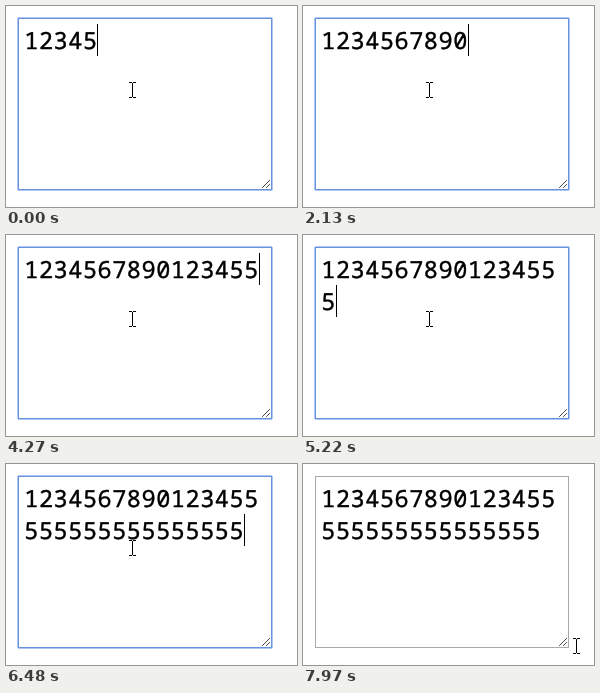
Recreate the animation shown at these times as an HTML page. Size 291x201 px, loop 8000 ms.

```html
<!DOCTYPE html>
<html lang="en">
<head>
<meta charset="utf-8">
<title>Typing in a text area</title>
<style>
  html, body { margin: 0; width: 100%; height: 100%; overflow: hidden; background: #fff; }
  svg { display: block; width: 291px; height: 201px; }
  text {
    font: 23.6px "Noto Sans Mono", monospace;
    letter-spacing: .503px;
    text-rendering: geometricPrecision;
    stroke: #000;
    stroke-width: .4px;
  }
  .box { fill: #fff; stroke: #a9a9a9; }
  .ring { fill: none; stroke: #4d80ea; stroke-opacity: .45; }
  .focus .box { stroke: #6892de; }
  svg:not(.focus) .ring { display: none; }
  .grip { fill: none; stroke: #444; stroke-linecap: square; }
</style>
</head>
<body>
<svg id="stage" class="focus" viewBox="0 0 291 201">
  <rect class="ring" x="11.5" y="11.5" width="255" height="173" rx="1.5"/>
  <rect class="box" x="12.5" y="12.5" width="253" height="171"/>
  <path class="grip" d="M256.500 181.500l7-7M260.500 181.500l3-3"/>
  <text id="line1" x="18.250" y="42.800"></text>
  <text id="line2" x="18.250" y="74.800"></text>
  <rect id="caret" width="1" height="32"/>
  <path id="mouse" d="M0 0h3v1h1v-1h3v1h-3v14h3v1h-3v-1h-1v1h-3v-1h3v-14h-3z"/>
</svg>
<script>
const LOOP = 8000, COLS = 16, ADVANCE = 14.663, LINE = 32, LEFT = 18;
const BLINK = 555, BLUR = 7700;
const content = "123456789012345".padEnd(31, "5");

// Times of single key presses; then the last key is held and repeats
const keys = [150, 300, 580, 860, 1010, 2250, 2530, 2690, 2960, 3230, 4270, 5220, 5620];
const HOLD = 6170, REPEAT = 155, PER_REPEAT = 5, PRESET = 5;

// Pointer stops as [step, x, y]; it is redrawn once per step
const MOVE = 7030, STEP = 134;
const stops = [[0, 123, 76], [4, 261, 188], [6, 262, 176], [7, 270, 174]];

const $ = id => document.getElementById(id);
const [stage, line1, line2, caret, mouse] =
  ["stage", "line1", "line2", "caret", "mouse"].map($);

function typing(t) {
  const pressed = keys.filter(k => k <= t);
  let count = PRESET + pressed.length;
  let last = pressed.length ? pressed[pressed.length - 1] : 0;
  for (let k = HOLD; k <= t && count < content.length; k += REPEAT) {
    count = Math.min(count + PER_REPEAT, content.length);
    last = k;
  }
  return { count, last };
}

function pointerAt(t) {
  const s = Math.min(7, Math.max(0, Math.floor((t - MOVE) / STEP)));
  const i = Math.max(1, stops.findIndex(p => p[0] >= s));
  const [s0, x0, y0] = stops[i - 1], [s1, x1, y1] = stops[i];
  const ease = 1 - (1 - (s - s0) / (s1 - s0)) ** 2;
  return [x0 + (x1 - x0) * ease, y0 + (y1 - y0) * ease].map(Math.round);
}

function setText(node, s) {
  if (node.textContent !== s) node.textContent = s;
}

function draw(t) {
  const { count, last } = typing(t);
  const row = count > COLS ? 1 : 0;
  const lit = t < BLUR && Math.floor((t - last) / BLINK) % 2 === 0;
  setText(line1, content.slice(0, Math.min(count, COLS)));
  setText(line2, content.slice(COLS, Math.max(count, COLS)));
  caret.setAttribute("x", Math.round(LEFT + ADVANCE * (count - row * COLS)));
  caret.setAttribute("y", LEFT + LINE * row);
  caret.setAttribute("opacity", lit ? 1 : 0);
  mouse.setAttribute("transform", `translate(${pointerAt(t)})`);
  stage.classList.toggle("focus", t < BLUR);
}

const start = performance.now();
function tick() {
  draw((performance.now() - start) % LOOP);
  requestAnimationFrame(tick);
}
draw(0);
requestAnimationFrame(tick);
</script>
</body>
</html>
```
